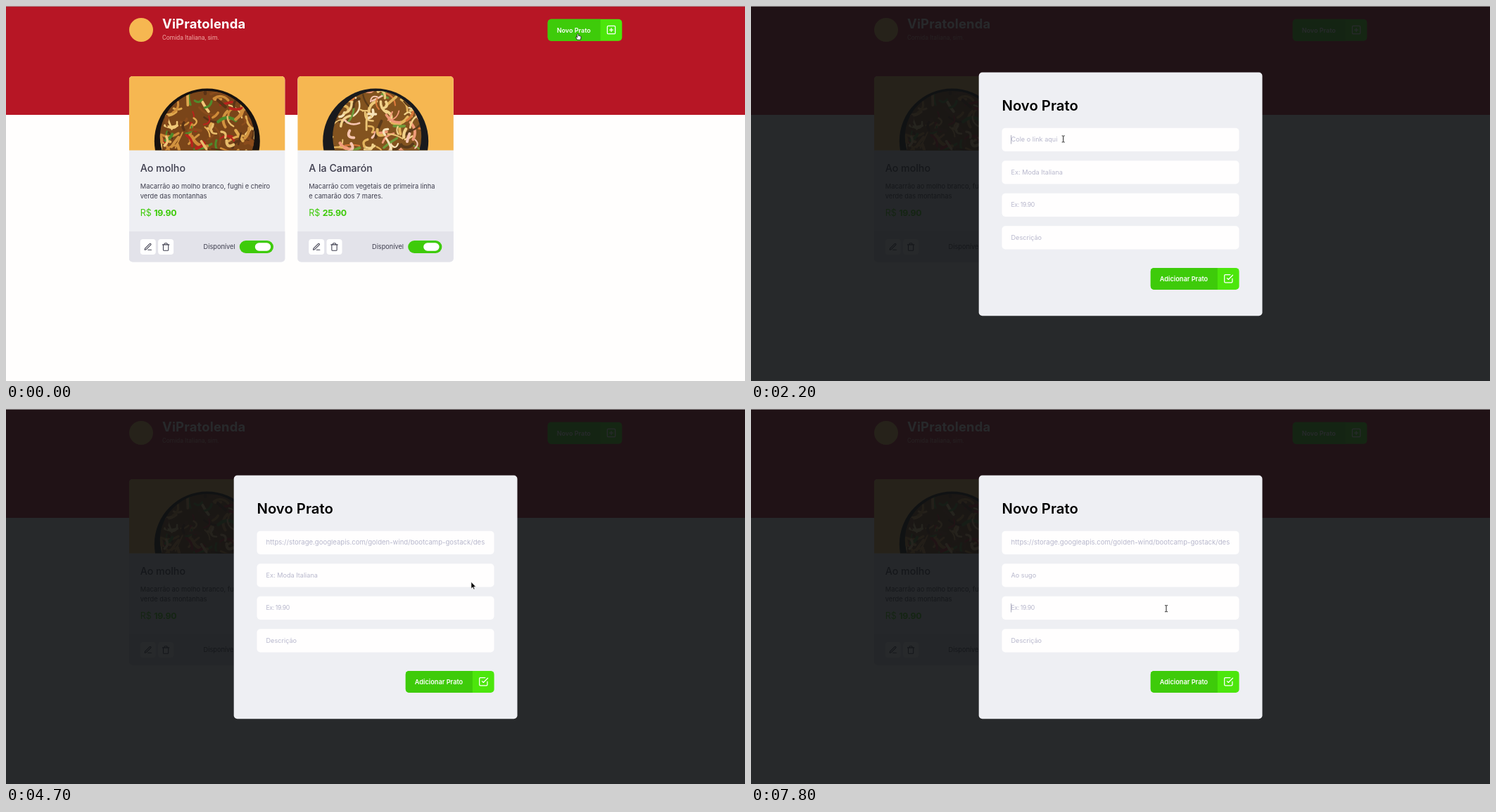
An HTML page that plays this animation: 1050x534 px, repeating every 8000 ms.

```html
<!DOCTYPE html>
<html lang="pt-BR">
<head>
<meta charset="utf-8">
<title>Novo Prato</title>
<style>
  html, body { margin: 0; width: 100%; height: 100%; overflow: hidden; background: #fffefd; }
  svg { display: block; }
  #stage { width: 1050px; height: 534px; }
  text { font-family: Inter, "Open Sans", sans-serif; font-size: 9.3px; fill: #3d3d4d; white-space: pre; }
  .brand { font-size: 18.4px; font-weight: 700; letter-spacing: .2px; fill: #fff; }
  .tagline { font: 400 8.7px Roboto, sans-serif; fill: #f0a9a5; }
  .dish { font-size: 14.2px; font-weight: 500; }
  .price { font-size: 12.5px; fill: #3ecb0a; }
  .sum { font-size: 12.4px; font-weight: 700; letter-spacing: -.3px; fill: #3ecb0a; }
  .label { font-size: 9.2px; }
  .btn { font-size: 9.2px; font-weight: 600; fill: #fff; }
  .title { font-size: 20.3px; font-weight: 600; fill: #000; }
  .field { font-size: 9.15px; fill: #b7b7cc; }
  .link { font-size: 9.56px; }
  .tight { font-size: 8.7px; letter-spacing: -.4px; }
  .icon { fill: none; stroke-width: 2; stroke-linecap: round; stroke-linejoin: round; }
</style>
</head>
<body>
<svg id="stage" viewBox="0 0 1050 534"></svg>
<script>
const GREEN = '#3ecb0a', LIME = '#4ce60c', PANEL = '#eeeff3';
const LOOP = 8000;
const URL_HEAD = 'https://storage.googleapis.com/golden-wind/bootcamp-gostack/des';
const URL_TAIL = 'golden-wind/bootcamp-gostack/desafio-food/food1.png';

const ICONS = {
  pencil: 'M12 20h9M16.5 3.5a2.12 2.12 0 0 1 3 3L7 19l-4 1 1-4z',
  trash: 'M3 6h18M19 6v14a2 2 0 0 1-2 2H7a2 2 0 0 1-2-2V6m3 0V4a2 2 0 0 1 2-2h4a2 2 0 0 1 2 2v2',
  plus: 'M5 3h14a2 2 0 0 1 2 2v14a2 2 0 0 1-2 2H5a2 2 0 0 1-2-2V5a2 2 0 0 1 2-2zM12 8v8M8 12h8',
  check: 'M9 11l3 3L22 4M21 12v7a2 2 0 0 1-2 2H5a2 2 0 0 1-2-2V5a2 2 0 0 1 2-2h11'
};

const rect = (x, y, w, h, fill, r = 0) =>
  `<rect x="${x}" y="${y}" width="${w}" height="${h}" rx="${r}" fill="${fill}"/>`;
const text = (x, y, str, cls = '', extra = '') =>
  `<text x="${x}" y="${y}" class="${cls}" ${extra}>${str}</text>`;
const icon = (name, cx, cy, size, color) =>
  `<path class="icon" d="${ICONS[name]}" stroke="${color}"
    transform="translate(${cx - size / 2} ${cy - size / 2}) scale(${size / 24})"/>`;

function button(x, y, w, label, name, size) {
  const split = x + w - 30.7;
  return rect(x, y, w, 31, LIME, 5) +
    `<path d="M${split} ${y}H${x + 5}a5 5 0 0 0-5 5v21a5 5 0 0 0 5 5H${split}z" fill="${GREEN}"/>` +
    text(x + 13, y + 18.7, label, 'btn', `style="font-size:${size}px"`) +
    icon(name, split + 15.4, y + 15.3, 15, '#fff');
}

function random(seed) {
  return () => (seed = (seed * 16807) % 2147483647) / 2147483647;
}

// Simplified plate of pasta: bowl, base tone and loose strands
function plate(id, bowl, base, cx, rx, tones, seed) {
  const rnd = random(seed);
  let strands = '';
  for (let i = 0; i < 110; i++) {
    const x = cx - rx + rnd() * 2 * rx, y = 18 + rnd() * 90;
    const a = rnd() * 6.28, len = 9 + rnd() * 17, bend = rnd() * 20 - 10;
    const dx = Math.cos(a) * len, dy = Math.sin(a) * len;
    strands += `<path d="M${x} ${y}q${dx / 2 - dy / len * bend} ${dy / 2 + dx / len * bend} ${dx} ${dy}"
      stroke="${tones[i % tones.length]}" stroke-width="${1.8 + rnd() * 2.8}"/>`;
  }
  return `<clipPath id="${id}"><ellipse cx="${cx}" cy="86" rx="${rx}" ry="65"/></clipPath>
    <circle cx="111" cy="92.5" r="75" fill="${bowl}"/>
    <g clip-path="url(#${id})" fill="none" stroke-linecap="round">
      ${rect(30, 15, 170, 95, base)}${strands}</g>`;
}

function card(x, d) {
  const tool = (tx, name) => rect(tx, 232, 22, 22, '#fff', 4) + icon(name, tx + 11, 243, 12.5, '#3d3d4d');
  return `<g transform="translate(${x} 100)"><g clip-path="url(#cardShape)">
    ${rect(0, 0, 222, 265, PANEL)}${rect(0, 221, 222, 44, '#e3e3ea')}
    <svg width="222" height="105.5">${rect(0, 0, 222, 106, '#f6b751')}${d.art}</svg></g>
    ${text(16, 136, d.name, 'dish')}
    ${d.lines.map((s, i) => text(16, 159.8 + i * 13.7, s)).join('')}
    ${text(16, 199.3, 'R$', 'price')}${text(35.5, 199.3, d.price, 'sum')}
    ${tool(16, 'pencil')}${tool(41.3, 'trash')}
    ${text(105.8, 246.3, 'Disponível', 'label')}
    ${rect(157, 234, 48.2, 18, GREEN, 9)}${rect(179, 237.3, 22.4, 11.4, '#fff', 5.7)}
  </g>`;
}

const sauce = {
  name: 'Ao molho', price: '19.90',
  lines: ['Macarrão ao molho branco, fughi e cheiro', 'verde das montanhas'],
  art: plate('foodA', '#17120f', '#7a4519', 111, 67,
    ['#e0a84e', '#5a3316', '#f0c878', '#b8231c', '#d2933f', '#4f8a2b', '#e8bd6c', '#8a4c1c', '#cf8b38'], 41)
};
const shrimp = {
  name: 'A la Camarón', price: '25.90',
  lines: ['Macarrão com vegetais de primeira linha', 'e camarão dos 7 mares.'],
  art: plate('foodB', '#191a1d', '#83531f', 113, 63,
    ['#e3b45c', '#ef9a78', '#f1d28a', '#5a3a1a', '#f6c4ae', '#6f9a3a', '#ecc677', '#d9783a', '#f5e2b8'], 97)
};

const FIELD_Y = [173.7, 220.2, 266.7, 313.2];
const base = i => FIELD_Y[i] + 19.7;

const page = rect(0, 0, 1050, 534, '#fffefd') + rect(0, 0, 1050, 155, '#b71625') +
  '<circle cx="192" cy="34" r="17" fill="#f6b751"/>' +
  text(222, 32.3, 'ViPratolenda', 'brand') +
  text(222, 47.5, 'Comida Italiana, sim.', 'tagline') +
  button(769.7, 18.8, 105.6, 'Novo Prato', 'plus', 9) +
  card(174.8, sauce) + card(414.2, shrimp);

const modal = `<g id="modal">${rect(0, 0, 1050, 534, '#101214e6')}
  ${rect(323.7, 94.6, 402.8, 346.6, PANEL, 5)}
  ${text(356.5, 148.6, 'Novo Prato', 'title')}
  ${FIELD_Y.map(y => rect(356.5, y, 337, 33.2, '#fffefe', 5)).join('')}
  <svg x="369.5" y="174" width="311" height="33">${text(0, base(0) - 174, '', 'field', 'id="link"')}</svg>
  ${text(369.5, base(1), '', 'field', 'id="name"')}
  ${text(369.5, base(2), 'Ex: 19.90', 'field tight')}
  ${text(369.5, base(3), 'Descrição', 'field')}
  ${button(567.8, 372.9, 125.8, 'Adicionar Prato', 'check', 9.2)}
  <rect id="caret" width=".8" height="12.6" fill="#9696ab"/></g>`;

const pointers = `<g id="hand"><path d="M-.9 .7V5.3L-2.1 4.4Q-3.2 4.2-2.9 5.3L-.9 8.6H4L4.6 4.4Q4.5 3.3 3.7 3.6 3.2 2.7 2.4 3.2 1.8 2.4 1 2.9V.7Q0-.4-.9 .7Z"
    fill="#fff" stroke="#111" stroke-width=".8"/></g>
  <g id="arrow"><path d="M0 0V9.6L2.2 7.6 3.7 10.9 5.2 10.2 3.8 7.1H6.8Z"
    fill="#000" stroke="#fff" stroke-width=".7"/></g>
  <g id="beam"><path d="M-2-4.5H-.5L0-4 .5-4.5H2M0-4V4M-2 4.5H-.5L0 4 .5 4.5H2"
    fill="none" stroke="#222" stroke-width="1"/></g>`;

const stage = document.getElementById('stage');
stage.innerHTML = `<defs><clipPath id="cardShape"><rect width="221.6" height="264.5" rx="5"/></clipPath></defs>
  ${page}${modal}${rect(0, 0, 1050, .8, '#a9a5a7')}${pointers}`;
const el = id => document.getElementById(id);

// Each step changes some of: pointer, place, link, typed name, caret field (-1 hides it)
const STEPS = [
  [0, { open: false, ptr: 'hand', at: [812.5, 39.6], link: '', name: '', caret: -1 }],
  [1000, { open: true, ptr: 'arrow', at: [811.3, 40] }],
  [1200, { at: [748, 64] }],
  [1300, { at: [596, 119] }],
  [1400, { at: [519, 146] }],
  [1600, { at: [490, 168] }],
  [1700, { ptr: 'beam', at: [452, 196] }],
  [1800, { at: [444, 191], caret: 0 }],
  [2100, { at: [443.7, 189.4] }],
  [2300, { link: 'tail' }],
  [2400, { at: [447, 233] }],
  [2600, { at: [455, 236] }],
  [2700, { at: [457, 235], link: 'head', caret: 1 }],
  [2900, { at: [467.6, 232.7] }],
  [3000, { at: [575, 231] }],
  [3100, { ptr: 'arrow', at: [660.9, 246.2] }],
  [3300, { caret: -1 }],
  [3900, { caret: 1 }],
  [4700, { caret: -1 }],
  [5000, { name: 'A', caret: 1 }],
  [5700, { name: 'Ao' }],
  [5800, { name: 'Ao s' }],
  [5900, { name: 'Ao su' }],
  [6200, { name: 'Ao sug' }],
  [6400, { name: 'Ao sugo' }],
  [7000, { ptr: 'beam', at: [661, 250], caret: -1 }],
  [7100, { at: [659, 249] }],
  [7300, { ptr: 'arrow', at: [644, 258] }],
  [7400, { ptr: 'beam', at: [613, 277] }],
  [7500, { at: [595, 284] }],
  [7600, { at: [590, 283.6], caret: 2 }],
  [7800, { at: [590, 284.2] }]
];
let state = {};
const states = STEPS.map(([t, change]) => ({ t, ...(state = { ...state, ...change }) }));

function show(s) {
  el('modal').style.display = s.open ? '' : 'none';
  for (const id of ['hand', 'arrow', 'beam']) el(id).style.display = id === s.ptr ? '' : 'none';
  el(s.ptr).setAttribute('transform', `translate(${s.at})`);

  const link = el('link'), name = el('name'), tail = s.link === 'tail';
  link.textContent = tail ? URL_TAIL : s.link ? URL_HEAD : 'Cole o link aqui';
  link.setAttribute('class', s.link ? 'field link' : 'field');
  link.setAttribute('x', tail ? 310 : 0);
  link.setAttribute('text-anchor', tail ? 'end' : 'start');
  name.textContent = s.name || 'Ex: Moda Italiana';

  const caret = el('caret');
  caret.style.display = s.caret < 0 ? 'none' : '';
  if (s.caret < 0) return;
  let x = 369.3;
  if (s.caret === 0 && tail) x = 679.8;
  if (s.caret === 1 && s.name) x = 369.7 + name.getComputedTextLength();
  caret.setAttribute('x', x);
  caret.setAttribute('y', FIELD_Y[s.caret] + 10.2);
}

let last;
function tick() {
  const t = performance.now() % LOOP;
  const now = states.findLast(s => s.t <= t);
  if (now !== last) show(last = now);
  requestAnimationFrame(tick);
}
tick();
</script>
</body>
</html>
```
